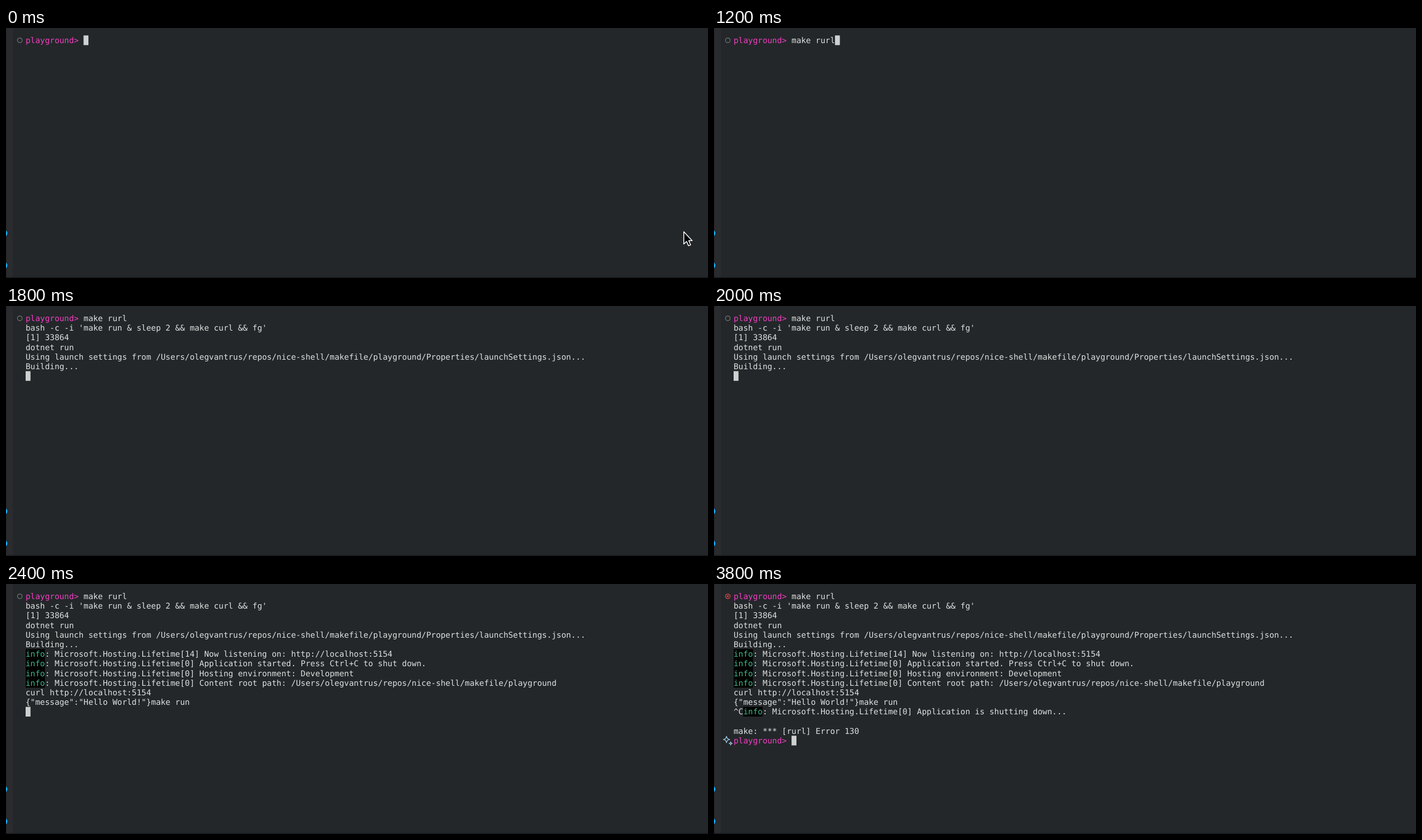
These frames come from a looping animation (1252 by 447 pixels, 4580 ms). An HTML page:

```html
<!DOCTYPE html>
<html lang="en">
<head>
<meta charset="utf-8">
<title>Terminal session</title>
<style>
  html, body { margin: 0; width: 100%; height: 100%; overflow: hidden; background: #232729; }
  svg { display: block; width: 100%; height: 100%; }
  text {
    font: 14.3px "DejaVu Sans Mono", "Liberation Mono", monospace;
    white-space: pre;
    text-rendering: geometricPrecision;
    fill: #dfe1e1;
  }
  .prompt { fill: #f03fc1; }
  .info { fill: #3dbb8b; }
</style>
</head>
<body>
<svg viewBox="0 0 1252 447" xmlns="http://www.w3.org/2000/svg">
  <rect width="1252" height="447" fill="#232729"/>
  <rect width="12" height="447" fill="#2a2b2e"/>
  <rect width="1" height="447" fill="#222427"/>
  <rect y="445.5" width="1252" height="1.5" fill="#181b1d"/>
  <g fill="#18aefa">
    <circle cx="-4" cy="367" r="6.5"/>
    <circle cx="-4" cy="424.5" r="6.5"/>
  </g>
  <circle id="idle" cx="24.6" cy="22" r="4.2" fill="none" stroke="#73777a" stroke-width="1.2"/>
  <g id="failed" fill="none" stroke="#e0484f" stroke-width="1.2">
    <circle cx="24.6" cy="22" r="4.2"/>
    <path d="M22.8 20.2l3.6 3.6m0-3.6l-3.6 3.6"/>
  </g>
  <g id="sparkle" fill="none" stroke="#9fcbe6" stroke-width="1.2" stroke-linejoin="round"></g>
  <g id="screen"></g>
  <rect id="caret" width="8.7" height="17.3" fill="#cfd0d0"/>
  <path id="pointer" d="M1208.8 364.2V386.2L1213.8 381.6L1217.3 389.4L1221 387.8L1217.6 380.2H1223.8Z"
        fill="#000" stroke="#fff" stroke-width="1.5" stroke-linejoin="round"/>
</svg>
<script>
  const LOOP = 4580, LEFT = 35, TOP = 13.3, CELL = 8.609, ROW = 17.2;
  const $ = id => document.getElementById(id);
  const home = "/Users/olegvantrus/repos/nice-shell/makefile/playground";
  const command = "make rurl";
  const typeStart = 300, typeStep = 100, endAt = 3700;

  const colX = col => LEFT + col * CELL;
  const rowY = row => TOP + row * ROW;

  function add(parent, tag, attrs, content = "") {
    const el = document.createElementNS("http://www.w3.org/2000/svg", tag);
    for (const key in attrs) el.setAttribute(key, attrs[key]);
    el.textContent = content;
    return parent.appendChild(el);
  }

  // A row is a group of [text, class] parts that appears at a given time.
  function addRow(row, at, ...parts) {
    const group = add($("screen"), "g", {});
    let col = 0;
    for (const [text, kind = ""] of parts) {
      if (kind === "info")
        add(group, "rect", { x: colX(col), y: rowY(row), width: CELL * text.length, height: ROW + 0.1, fill: "#000" });
      add(group, "text", { x: colX(col), y: rowY(row) + 13.7, class: kind }, text);
      col += text.length;
    }
    return { group, at };
  }

  const prompt = ["playground>", "prompt"];
  const info = ["info", "info"];
  const log = (id, message) => [`: Microsoft.Hosting.Lifetime[${id}] ${message}`];

  const rows = [
    addRow(0, 0, prompt),
    addRow(1, 1400, ["bash -c -i 'make run & sleep 2 && make curl && fg'"]),
    addRow(2, 1400, ["[1] 33864"]),
    addRow(3, 1400, ["dotnet run"]),
    addRow(4, 1500, [`Using launch settings from ${home}/Properties/launchSettings.json...`]),
    addRow(5, 1500, ["Building..."]),
    addRow(6, 2200, info, log(14, "Now listening on: http://localhost:5154")),
    addRow(7, 2200, info, log(0, "Application started. Press Ctrl+C to shut down.")),
    addRow(8, 2200, info, log(0, "Hosting environment: Development")),
    addRow(9, 2200, info, log(0, `Content root path: ${home}`)),
    addRow(10, 2300, ["curl http://localhost:5154"]),
    addRow(11, 2400, ['{"message":"Hello World!"}make run']),
    addRow(12, endAt, ["^C"], info, log(0, "Application is shutting down...")),
    addRow(14, endAt, ["make: *** [rurl] Error 130"]),
    addRow(15, endAt, prompt)
  ];
  const typed = add($("screen"), "text", { x: colX(12), y: rowY(0) + 13.7 });

  function star(x, y, r) {
    const k = r * 0.27;
    add($("sparkle"), "path", {
      d: `M${x} ${y - r}L${x + k} ${y - k}L${x + r} ${y}L${x + k} ${y + k}` +
         `L${x} ${y + r}L${x - k} ${y + k}L${x - r} ${y}L${x - k} ${y - k}Z`
    });
  }
  star(22.3, 278, 5.8);
  star(29.7, 285, 2.9);

  const show = (el, on) => el.setAttribute("visibility", on ? "visible" : "hidden");

  function caretCell(t, count) {
    if (t >= endAt) return [12, 15];
    if (t < 1400) return [12 + count, 0];
    return [0, rows.filter(r => t >= r.at).length];
  }

  function draw(t) {
    const count = Math.max(0, Math.min(command.length, Math.floor((t - typeStart) / typeStep) + 1));
    typed.textContent = command.slice(0, count);
    for (const r of rows) show(r.group, t >= r.at);
    const [col, row] = caretCell(t, count);
    $("caret").setAttribute("x", colX(col));
    $("caret").setAttribute("y", rowY(row));
    show($("pointer"), t < 100);
    show($("idle"), t < endAt);
    show($("failed"), t >= endAt);
    show($("sparkle"), t >= endAt);
  }

  const start = performance.now();
  function tick() {
    draw((performance.now() - start) % LOOP);
    requestAnimationFrame(tick);
  }
  tick();
</script>
</body>
</html>
```
